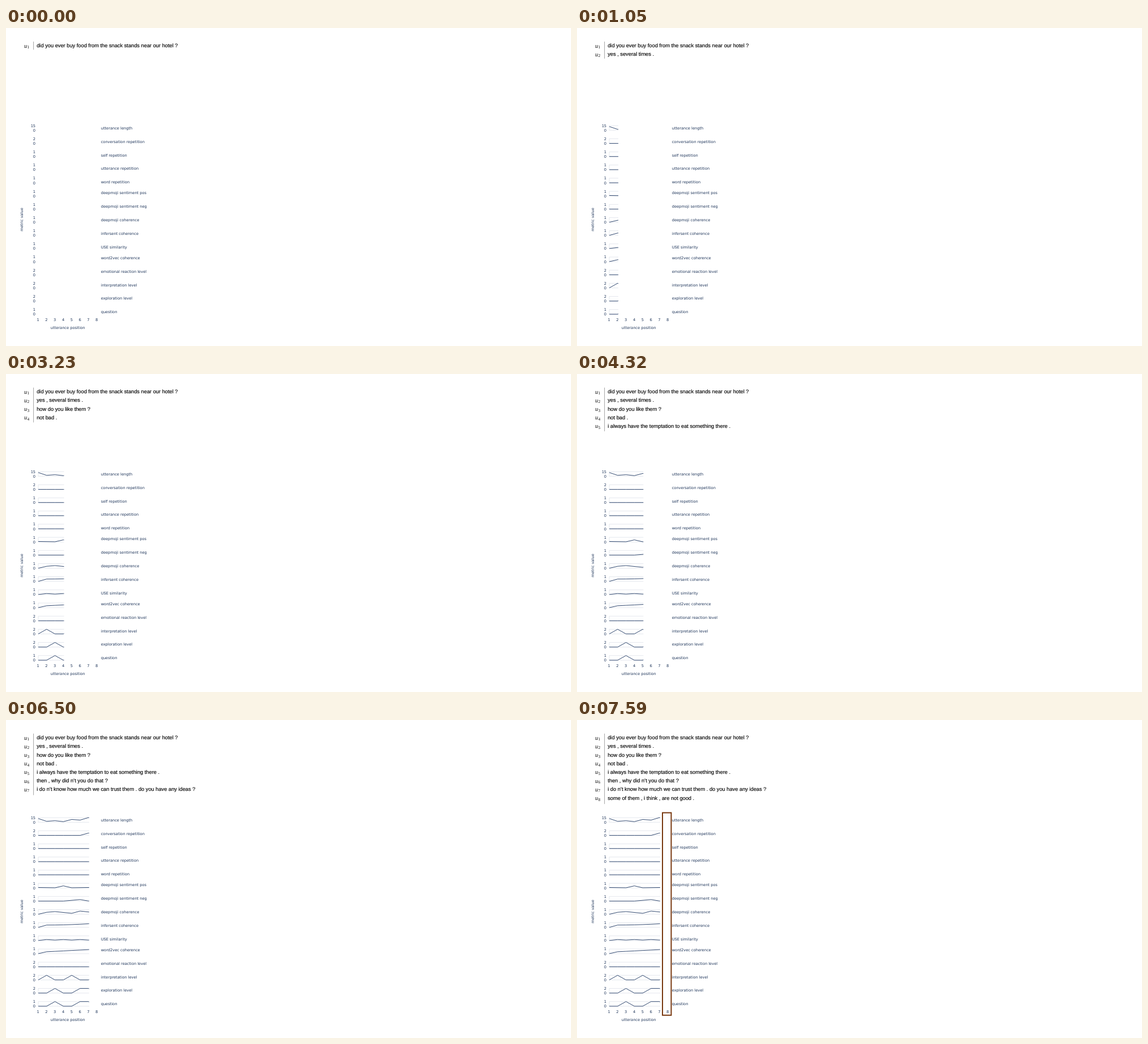
Write an HTML page that moves like this. It is 998 px wide and 561 px high and loops after 8 s.

```html
<!DOCTYPE html>
<html lang="en">
<head>
<meta charset="utf-8">
<title>Dialogue metrics</title>
<style>
  html, body { margin: 0; width: 100%; height: 100%; overflow: hidden; background: #fff; }
  svg { display: block; width: 100%; height: 100%; }
  text { white-space: pre; text-rendering: geometricPrecision; }
  .chart { font: 6.65px "DejaVu Sans", sans-serif; fill: #1c3358; }
  .speech { font: 9.28px "Liberation Sans", Arial, sans-serif; fill: #000; stroke: #000; stroke-width: .15; }
  .symbol { font: italic 10.6px "Liberation Serif", serif; fill: #111; }
  .index { font: 7.4px "Liberation Serif", serif; fill: #111; }
  .grid { stroke: #dfe3ea; stroke-width: .8; fill: none; }
  .trace { stroke: #1f3862; stroke-width: .9; fill: none; }
</style>
</head>
<body>
<svg id="stage" viewBox="0 0 998 561">
  <clipPath id="reveal"><rect id="window" x="56" y="160" width="0" height="350"/></clipPath>
</svg>
<script>
const LOOP = 8000, STEP = 1090, LEAD = 40;
const LEFT = 57, COLUMN = 14.77, TOP = 172.2, ROW = 23.18, HEIGHT = 8.2;

const utterances = [
  "did you ever buy food from the snack stands near our hotel ?",
  "yes , several times .",
  "how do you like them ?",
  "not bad .",
  "i always have the temptation to eat something there .",
  "then , why did n’t you do that ?",
  "i do n’t know how much we can trust them . do you have any ideas ?",
  "some of them , i think , are not good ."
];

// Builds a curve over utterance positions from a rule, or from [position, value] key points.
const rule = valueAt => utterances.map((speech, k) => [k, valueAt(k, speech)]);
const afterFirst = valueAt => rule((k, speech) => k ? valueAt(k, speech) : 0);

const wordCount = speech => speech.split(" ").filter(word => /\w/.test(word)).length;
const isQuestion = (k, speech) => Number(speech.includes("?"));
const flat = rule(() => 0);

// name, axis maximum, curve
const metrics = [
  ["utterance length", 15, rule((k, speech) => wordCount(speech))],
  ["conversation repetition", 2, rule(k => Number(k > 5))],
  ["self repetition", 1, flat],
  ["utterance repetition", 1, flat],
  ["word repetition", 1, flat],
  ["deepmoji sentiment pos", 1, [[0, .1], [2, .04], [3, .45], [4, .04], [7, .13]]],
  ["deepmoji sentiment neg", 1, [[0, 0], [3, 0], [5, .33], [6, .02], [7, .02]]],
  ["deepmoji coherence", 1, [[0, 0], [1, .42], [2, .57], [4, .2], [5, .68], [7, .3]]],
  ["infersent coherence", 1, afterFirst(k => .5 + .011 * (k - 1) ** 2)],
  ["USE similarity", 1, afterFirst(k => .16 - .06 * Math.cos(Math.PI * k))],
  ["word2vec coherence", 1, afterFirst(k => .32 + .09 * k)],
  ["emotional reaction level", 2, flat],
  ["interpretation level", 2, rule(k => k % 3 === 1 ? 2 : 0)],
  ["exploration level", 2, afterFirst((k, speech) => 2 * isQuestion(k, speech))],
  ["question", 1, afterFirst(isQuestion)]
];

const stage = document.getElementById("stage");
const revealWindow = document.getElementById("window");

function add(tag, attributes, parent = stage, content = "") {
  const node = document.createElementNS("http://www.w3.org/2000/svg", tag);
  for (const key in attributes) node.setAttribute(key, attributes[key]);
  node.textContent = content;
  parent.append(node);
  return node;
}

function label(content, x, y, anchor = "start", style = "chart", parent = stage) {
  return add("text", { x, y, class: style, "text-anchor": anchor }, parent, content);
}

const columnX = k => LEFT + COLUMN * k;

const bar = add("line", { x1: 48.6, x2: 48.6, y1: 24, y2: 38, stroke: "#999", "stroke-width": .9 });
const lines = utterances.map((speech, i) => {
  const group = add("g", {}), y = 34.2 + 15.2 * i;
  label("u", 31.9, y + .3, "start", "symbol", group);
  label(i + 1, 37.5, y + 1.9, "start", "index", group);
  label(speech, 54.2, y, "start", "speech", group);
  return group;
});

const plots = add("g", { "clip-path": "url(#reveal)" });
metrics.forEach(([name, max, curve], i) => {
  const top = TOP + ROW * i, bottom = top + HEIGHT;
  const points = curve.map(([k, value]) => `${columnX(k)},${bottom - HEIGHT * value / max}`);
  add("path", { class: "grid", d: `M${columnX(7)} ${top}H${LEFT}V${bottom}H${columnX(7)}` }, plots);
  add("polyline", { class: "trace", points: points.join(" ") }, plots);
  label(max, 52.1, top + 2.4, "end");
  label(0, 52.1, bottom + 2.4, "end");
  label(name, 167.7, 178.9 + 114.5 * Math.floor(i / 5) + 23.85 * (i % 5));
});

const highlight = add("rect", {
  x: 151, y: 163.6, width: 15.4, height: 357.2, fill: "#fff", stroke: "#78380f", "stroke-width": 2
});
utterances.forEach((_, i) => label(i + 1, columnX(i) - .3, 516.9, "middle"));
label("utterance position", 109.2, 531.3, "middle");
label("metric value", 0, 0, "middle").setAttribute("transform", "translate(29.8 338) rotate(-90)");

function render(time) {
  const count = 1 + Math.floor((time % LOOP + LEAD) / STEP);
  const plotted = Math.min(count, 7);
  lines.forEach((line, i) => line.setAttribute("visibility", i < count ? "visible" : "hidden"));
  bar.setAttribute("y2", 38.3 + 15.7 * (count - 1));
  revealWindow.setAttribute("width", plotted > 1 ? columnX(plotted - 1) + 1.2 - 56 : 0);
  highlight.setAttribute("visibility", count === 8 ? "visible" : "hidden");
}

const start = performance.now();
function tick() {
  render(performance.now() - start);
  requestAnimationFrame(tick);
}
tick();
</script>
</body>
</html>
```
